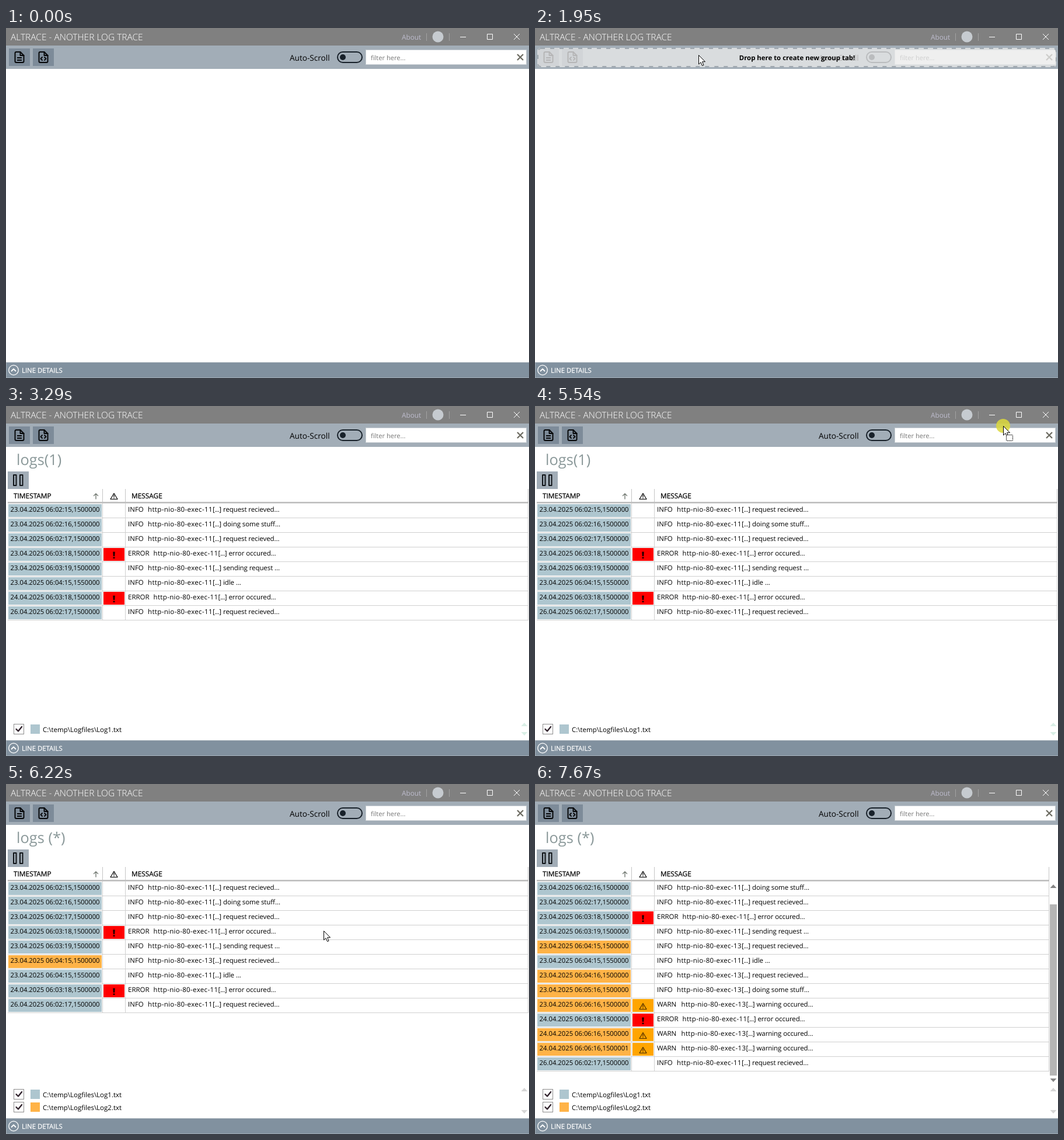
An HTML page for the animation above (8000 ms loop, 896 by 599 pixels).

```html
<!DOCTYPE html>
<html lang="en">
<head>
<meta charset="utf-8">
<title>ALTRACE</title>
<style>
html, body { margin: 0; width: 100%; height: 100%; overflow: hidden; background: #fff; }
svg { display: block; width: 896px; height: 599px; }
text { font: 11.5px "Open Sans", "Noto Sans", sans-serif; text-rendering: geometricPrecision; }
.title { font-size: 15.5px; font-weight: 300; fill: #fff; }
.about { font-size: 11.8px; fill: #bdbccd; }
.auto { font-size: 13.6px; }
.hint { font-size: 11.1px; fill: #777; }
.drop { font-size: 11.4px; font-weight: 700; text-anchor: middle; }
.tab { font-size: 25.4px; fill: #8a9899; }
.head { font-size: 11.85px; stroke: #000; stroke-width: .25px; }
.status { font-size: 11.4px; fill: #fff; stroke: #fff; stroke-width: .25px; }
.time { font-size: 11.27px; }
.thread { letter-spacing: .35px; }
.dots { letter-spacing: -.4px; }
.note { letter-spacing: -.08px; }
.line { fill: none; stroke-linecap: round; stroke-linejoin: round; }
.hover text { fill: #fff; }
</style>
</head>
<body>
<svg id="stage" viewBox="0 0 896 599">
  <defs>
    <clipPath id="view"><rect y="166" width="896" height="350"/></clipPath>
    <g id="page" class="line" stroke="#050608" stroke-width="2">
      <path d="M3 1H10L16 7V17Q16 19 14 19H3Q1 19 1 17V3Q1 1 3 1Z"/>
      <path d="M10 1V7H16"/>
    </g>
    <path id="warn" class="line" d="M0 -5L6 5H-6ZM0 -2V1.5M0 3V3.4" stroke-width="1.2"/>
    <path id="bang" d="M-1.800 -6H1.800L1.200 1.500H-1.200ZM-1.500 3H1.500V5.500H-1.500Z" fill="#200"/>
    <path id="check" class="line" d="M4.500 9L8 12.500L14 5" stroke="#33252f" stroke-width="2.4"/>
  </defs>

  <rect width="896" height="599" fill="#fff"/>
  <rect width="896" height="30" fill="#808080"/>
  <text class="title" x="8" y="21">ALTRACE - ANOTHER LOG TRACE</text>
  <text class="about" x="678" y="20">About</text>
  <path d="M720.5 9V22M759.5 9V22" stroke="#a3a3a3"/>
  <circle cx="740" cy="15" r="9.500" fill="#c6cbd0"/>
  <path d="M778 15.500H788M824.500 10.500H833.500V19.500H824.500ZM870 10L880 20M880 10L870 20" fill="none" stroke="#fff"/>

  <rect y="30" width="896" height="40" fill="#a2adb7"/>
  <path d="M5 35H41V65H5ZM46 35H82V65H46Z" fill="#7d8b99"/>
  <use href="#page" x="14.500" y="40"/>
  <path d="M19 51H27M19 55H27" stroke="#050608" stroke-width="2"/>
  <use href="#page" x="55.500" y="40"/>
  <path class="line" d="M62 50L59.500 52.500L62 55M66 50L68.500 52.500L66 55" stroke="#050608" stroke-width="1.800"/>
  <text class="auto" x="486" y="56">Auto-Scroll</text>
  <rect x="568" y="41" width="42" height="18" rx="9" fill="none" stroke="#18212a" stroke-width="2"/>
  <circle cx="577" cy="50" r="5" fill="#18212a"/>
  <rect x="616.500" y="37.500" width="275" height="25" fill="#fff" stroke="#c9cfd4"/>
  <text class="hint" x="625" y="55">filter here...</text>
  <path d="M876 45L886 55M886 45L876 55" stroke="#6d6c62" stroke-width="2.300"/>

  <g id="content">
    <text id="tab" class="tab" x="18" y="101"></text>
    <g id="table">
      <rect x="3" y="112" width="36" height="30" fill="#a2adb7"/>
      <path class="line" d="M13 118H17.500V136H13ZM24 118H28.500V136H24Z" stroke="#101418" stroke-width="2"/>
      <text class="head" x="13" y="158">TIMESTAMP</text>
      <path class="line" d="M154 159V150M150.500 153.500L154 150L157.500 153.500" stroke="#737a73" stroke-width="1.400"/>
      <use href="#warn" x="185" y="154.500" stroke="#000"/>
      <text class="head" x="215" y="158">MESSAGE</text>
      <path d="M165.500 142V164M204.500 142V164" stroke="#c4c4c4"/>
      <g id="frame"></g>
      <g id="rows" clip-path="url(#view)"></g>
      <g id="legend"></g>
    </g>
  </g>

  <rect y="572" width="896" height="27" fill="#81919f"/>
  <path d="M0 572.500H896M0 598.500H896M.5 572V599" stroke="#a9b3bb" stroke-width=".8"/>
  <circle cx="13" cy="585.500" r="8.300" fill="none" stroke="#fff" stroke-width="1.300"/>
  <path class="line" d="M9.500 587L13 583.500L16.500 587" stroke="#fff" stroke-width="1.800"/>
  <text class="status" x="27" y="590">LINE DETAILS</text>

  <g fill="#eaeaea" fill-opacity=".77" stroke="#a0a8af" stroke-width="2" stroke-dasharray="7 9">
    <rect id="dropGroup" x="1" y="71" width="894" height="500" rx="5"/>
    <g id="dropTab">
      <rect x="4" y="34" width="889" height="33" rx="5" stroke="none"/>
      <rect x="5" y="35" width="888" height="31" rx="5" fill="none"/>
      <text class="drop" x="449" y="55" fill="#000" fill-opacity="1" stroke="none">Drop here to create new group tab!</text>
    </g>
  </g>

  <g id="cursor">
    <circle id="press" r="12" fill="#dcd83c" opacity=".85"/>
    <path d="M.5 .5V16L4 12.700L6.500 18.500L9 17.500L6.600 11.700H11.500Z" fill="#fff" stroke="#000"/>
    <rect id="parcel" x="5.500" y="15.500" width="11" height="10" rx="1" fill="#fff" stroke="#000" stroke-dasharray="2 1"/>
  </g>
</svg>
<script>
const LOOP = 8000;
const COLORS = ['#aec6cf', '#ffb347'];
const THREAD_X = { INFO: 243, WARN: 250.5, ERROR: 252.5 };
const REQUEST = 'request recieved...', STUFF = 'doing some stuff...';
const FAIL = 'error occured...', CAUTION = 'warning occured...';

// time stamp, level, file index, message
const LOG = [
  ['23.04.2025 06:02:15,1500000', 'INFO', 0, REQUEST],
  ['23.04.2025 06:02:16,1500000', 'INFO', 0, STUFF],
  ['23.04.2025 06:02:17,1500000', 'INFO', 0, REQUEST],
  ['23.04.2025 06:03:18,1500000', 'ERROR', 0, FAIL],
  ['23.04.2025 06:03:19,1500000', 'INFO', 0, 'sending request ...'],
  ['23.04.2025 06:04:15,1500000', 'INFO', 1, REQUEST],
  ['23.04.2025 06:04:15,1550000', 'INFO', 0, 'idle ...'],
  ['23.04.2025 06:04:16,1500000', 'INFO', 1, REQUEST],
  ['23.04.2025 06:05:16,1500000', 'INFO', 1, STUFF],
  ['23.04.2025 06:06:16,1500000', 'WARN', 1, CAUTION],
  ['24.04.2025 06:03:18,1500000', 'ERROR', 0, FAIL],
  ['24.04.2025 06:06:16,1500000', 'WARN', 1, CAUTION],
  ['24.04.2025 06:06:16,1500001', 'WARN', 1, CAUTION],
  ['26.04.2025 06:02:17,1500000', 'INFO', 0, REQUEST]
];

// cursor legs: start, end, positions, from x, y, to x, y
const LEGS = [
  [910, 1540, 7, 340, 26, 280, 46],
  [2150, 2350, 3, 280, 46, 286, 66],
  [2490, 3290, 9, 286, 66, 900, 90],
  [5540, 5840, 4, 802, 34, 544, 251],
  [6940, 7060, 2, 544, 251, 547, 255],
  [7170, 7670, 6, 547, 255, 900, 300]
];

const $ = id => document.getElementById(id);
const show = (id, on) => { $(id).style.display = on ? '' : 'none'; };
const within = (t, a, b) => t >= a && t < b;
const rect = (x, y, w, h, fill) => `<rect x="${x}" y="${y}" width="${w}" height="${h}" fill="${fill}"/>`;
const label = (x, y, text, cls = '') => `<text class="${cls}" x="${x}" y="${y}">${text}</text>`;

function badge(level, y) {
  if (level === 'ERROR')
    return rect(167, y + 2, 36, 22, '#f00') + `<use href="#bang" x="185" y="${y + 14.5}"/>`;
  if (level === 'WARN')
    return rect(167, y + 2, 36, 22, '#ffa500') + `<use href="#warn" x="185" y="${y + 14.5}" stroke="#4a2a00"/>`;
  return '';
}

function row([time, level, file, note], i, right, hover) {
  const y = 166 + 25 * i, base = y + 15, x = THREAD_X[level];
  return `<g class="${hover ? 'hover' : ''}">` +
    (hover ? rect(3, y + 1, right - 3, 24, '#a2adb7') : '') +
    rect(4, y + 2, 160, 22, COLORS[file]) + badge(level, y) +
    label(7.6, base, time, 'time') +
    label(209, base, level) +
    label(x, base, `http-nio-80-exec-1${file ? 3 : 1}`, 'thread') +
    label(x + 111, base, '[...]', 'dots') +
    label(x + 129, base, note, 'note') +
    `<path d="M3 ${y + 25.5}H${right}M165.5 ${y}V${y + 25}M204.5 ${y}V${y + 25}M${right - .5} ${y}V${y + 25}" stroke="#d0d0d0"/></g>`;
}

function legendItem(file, y) {
  return `<rect x="13.5" y="${y - 8.5}" width="17" height="17" fill="#fff" stroke="#8d8d8d"/>` +
    `<use href="#check" x="13" y="${y - 9}"/>` +
    rect(42, y - 8, 16, 16, COLORS[file]) +
    label(63, y + 4.5, `C:\\temp\\Logfiles\\Log${file + 1}.txt`);
}

const arrow = (y, dir, fill) => `<path d="M882.5 ${y + 3 * dir}H893.5L888 ${y - 3 * dir}Z" fill="${fill}"/>`;

let shown = '';
function drawTable(stage, top, hover) {
  const key = [stage, top, hover].join();
  if (key === shown) return;
  shown = key;
  const full = stage === 3, right = full ? 881 : 895;
  const list = LOG.filter((r, i) => full || !r[2] || (stage === 2 && i === 5)).slice(top);
  $('tab').textContent = stage > 1 ? 'logs (*)' : 'logs(1)';
  $('rows').innerHTML = list.map((r, i) => row(r, i, right, i === hover)).join('');
  $('frame').innerHTML = rect(3, 164, right - 3, 2.6, '#bdbdbd') + rect(right - 1, 142, 1, 22, '#c4c4c4') +
    (full ? arrow(175, 1, '#858585') + rect(882, top ? 206 : 182, 12, 293, '#b5b5b5') + arrow(507, -1, '#858585') : '');
  $('legend').innerHTML = stage > 1
    ? legendItem(0, 531) + legendItem(1, 553) + arrow(523, 1, '#d6d6d6') + arrow(561, -1, '#d6d6d6')
    : legendItem(0, 553) + arrow(545, 1, '#d9efe6') + arrow(561, -1, '#d9efe6');
}

function cursorAt(t) {
  const leg = LEGS.filter(l => t >= l[0]).pop();
  if (!leg) return [0, 0];
  const [a, b, n, x0, y0, x1, y1] = leg;
  const k = Math.min(1, Math.floor((t - a) / (b - a) * (n - 1) + .001) / (n - 1));
  return [x0 + (x1 - x0) * k, y0 + (y1 - y0) * k];
}

function render(t) {
  const [x, y] = cursorAt(t);
  const drag = within(t, 910, 1950) || within(t, 5540, 6220);
  const stage = t < 6220 ? 1 : t < 6360 ? 2 : 3;
  const hover = within(t, 6940, 7670) ? Math.floor((y - 166) / 25) : -1;

  show('content', t >= 2250);
  show('table', t >= 2490);
  drawTable(stage, t >= 6940 ? 1 : 0, hover);

  show('dropTab', within(t, 910, 2150) || within(t, 5660, 6220));
  show('dropGroup', within(t, 5660, 6220));

  show('cursor', within(t, 910, 3290) || within(t, 5540, 7670));
  show('press', drag);
  show('parcel', drag);
  $('cursor').setAttribute('transform', `translate(${Math.round(x)} ${Math.round(y)})`);
}

const start = performance.now();
function tick() {
  render((performance.now() - start) % LOOP);
  requestAnimationFrame(tick);
}
tick();
</script>
</body>
</html>
```
